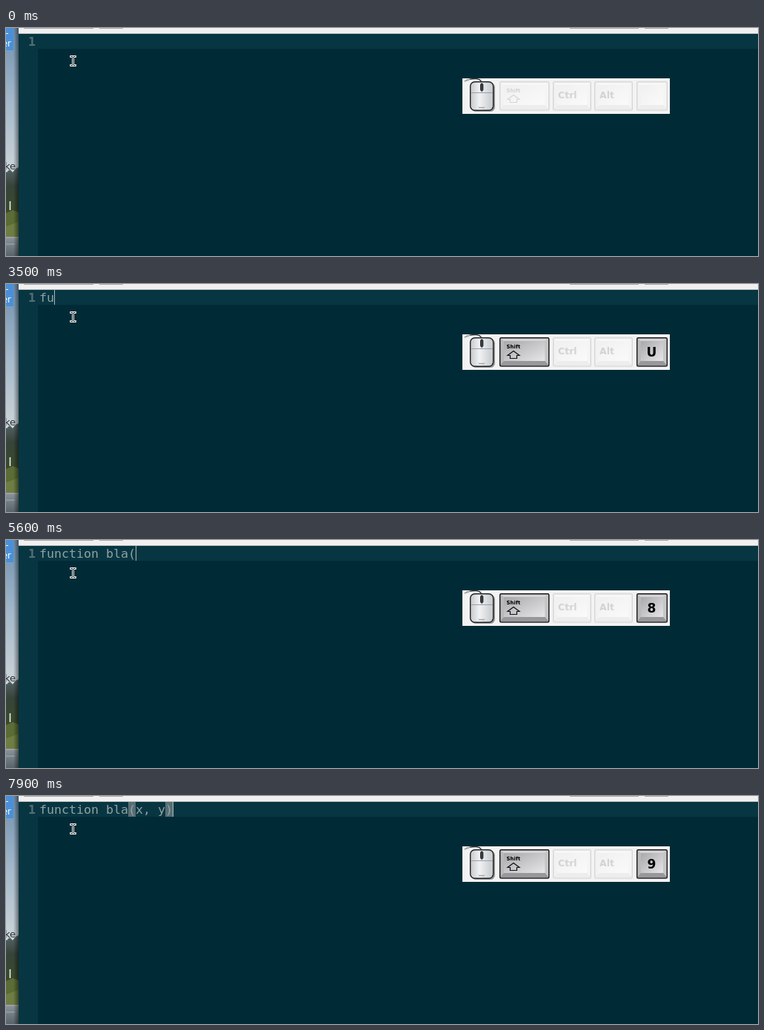
An HTML page for the animation above (8 s loop, 1015 by 308 pixels).

```html
<!DOCTYPE html>
<html lang="en">
<head>
<meta charset="utf-8">
<title>Typing with key display</title>
<style>
  html, body { margin: 0; width: 100%; height: 100%; overflow: hidden; background: #002b36; }
  svg { display: block; }
  .mono { font: 16.61px "DejaVu Sans Mono", monospace; white-space: pre; }
  .desk { font: 13px "DejaVu Sans", sans-serif; text-anchor: end; }
  .cap { font-family: "DejaVu Sans", sans-serif; font-weight: bold; }
  .dim { opacity: .17; }
</style>
</head>
<body>
<svg width="1015" height="308" viewBox="0 0 1015 308">
  <defs>
    <linearGradient id="sky" x2="0" y2="1">
      <stop offset="0" stop-color="#6f90ae"/>
      <stop offset=".5" stop-color="#a3b8c9"/>
      <stop offset="1" stop-color="#ccd4d9"/>
    </linearGradient>
    <linearGradient id="trees" x2="0" y2="1">
      <stop offset="0" stop-color="#56646a"/>
      <stop offset=".4" stop-color="#36443a"/>
      <stop offset="1" stop-color="#3a4a2a"/>
    </linearGradient>
    <linearGradient id="water" x2="0" y2="1">
      <stop offset="0" stop-color="#8b959a"/>
      <stop offset="1" stop-color="#59646a"/>
    </linearGradient>
    <linearGradient id="edge">
      <stop offset="0" stop-opacity="0"/>
      <stop offset="1" stop-opacity=".45"/>
    </linearGradient>
    <linearGradient id="face" x2="1" y2="1">
      <stop offset="0" stop-color="#a9a9ab"/>
      <stop offset="1" stop-color="#e6e6e8"/>
    </linearGradient>
    <linearGradient id="shell">
      <stop offset="0" stop-color="#c6cacd"/>
      <stop offset=".4" stop-color="#f0f2f3"/>
      <stop offset="1" stop-color="#c4c8cc"/>
    </linearGradient>
  </defs>

  <!-- desktop strip -->
  <rect width="17" height="195" fill="url(#sky)"/>
  <path d="M0 196 5 191 9 195 13 190 17 188V252H0Z" fill="url(#trees)"/>
  <path d="M0 250 9 246 17 249V283H0Z" fill="#5b6d35"/>
  <path d="M0 268 17 262V283H0Z" fill="#6d7d43"/>
  <rect y="282" width="17" height="26" fill="url(#water)"/>
  <path d="M0 283H17M0 292H12" stroke="#a9afb0"/>
  <path d="M5.5 234V246" stroke="#eef0ee" stroke-width="1.6"/>
  <rect x="10" width="7" height="308" fill="url(#edge)"/>
  <rect width="10" height="30" fill="#4a90d9"/>
  <path d="M0 7.5H3" stroke="#fff"/>
  <text class="desk" x="7" y="25" fill="#fff" style="font-size:12px">er</text>
  <text class="desk" x="13" y="191" fill="#2a3034">ke</text>

  <!-- editor window -->
  <rect x="17" width="998" height="308" fill="#002b36"/>
  <rect x="17" y="8" width="26" height="300" fill="#073642"/>
  <rect x="17" y="8" width="998" height="20" fill="#073642"/>
  <rect x="17" width="998" height="7" fill="#f0f0f0"/>
  <rect x="17" y="7" width="998" height="1" fill="#b8bcbc"/>
  <path d="M24 0H118M126 0H158M761 0H854M862 0H894" stroke="#8f8f8f" stroke-width="1.6"/>
  <text class="mono" x="30" y="24" fill="#586e75" style="font-weight:bold">1</text>
  <g id="match" fill="#586e75">
    <rect x="165" y="8" width="10" height="20"/>
    <rect x="215" y="8" width="10" height="20"/>
  </g>
  <text class="mono" id="code" x="45" y="24" fill="#93a1a1"></text>
  <rect id="caret" y="8" width="1" height="20" fill="#a9b8b8"/>

  <!-- text pointer -->
  <g fill="none" stroke-linecap="square">
    <path id="beam" d="M88 38.5H89.5L90.5 39.5 91.5 38.5H93M90.5 39.5V49.5M88 50.5H89.5L90.5 49.5 91.5 50.5H93" stroke="#f4f4f4" stroke-width="3"/>
    <use href="#beam" stroke="none"/>
    <path d="M88 38.5H89.5L90.5 39.5 91.5 38.5H93M90.5 39.5V49.5M88 50.5H89.5L90.5 49.5 91.5 50.5H93" stroke="#101010"/>
  </g>

  <!-- key display -->
  <rect id="panel" x="616" y="68" width="280" height="48" fill="#f2f3f2"/>
  <path d="M619 72Q625 68.5 633 68.5T642 74" fill="none" stroke="#333" stroke-width="1.3"/>
  <path d="M619 72Q622 70 626 69" fill="none" stroke="#aab0b0" stroke-width="1.6"/>
  <rect x="628" y="74" width="32" height="39" rx="6" fill="#777" opacity=".75"/>
  <rect x="626.7" y="72.7" width="31" height="38.5" rx="6" fill="url(#shell)" stroke="#222" stroke-width="1.4"/>
  <path d="M628 87.5H657M642 73V87" fill="none" stroke="#9ba0a4"/>
  <rect x="640.5" y="75" width="3.4" height="10" rx="1.7" fill="#3a3f42" stroke="#111" stroke-width=".8"/>
  <path d="M638 107.5H646" stroke="#a2a6aa" stroke-width="1.4"/>
  <g id="keys"></g>
</svg>
<script>
const LOOP = 8000;
const $ = id => document.getElementById(id);

// [time, characters typed, caret shown, shift held, key label]
const LINE = 'function bla(x, y)';
const steps = [[0, 0, 0, 0, ''], [200, 0, 1, 0, ''], [1000, 0, 0, 0, ''],
  [1400, 0, 1, 0, ''], [2300, 0, 0, 0, ''], [2500, 0, 1, 1, '']];
const press = (time, shift, label) => {
  const count = steps[steps.length - 1][1] + 1;
  steps.push([time, count, 1, shift, label || LINE[count - 1].toUpperCase()]);
};
[3400, 3500, 3700, 3800, 4000, 4100, 4200, 4400].forEach(t => press(t, 1));
press(4600, 1, 'Space');
[4900, 5100, 5200].forEach(t => press(t, 1));
press(5600, 1, '8');
steps.push([6200, 13, 1, 0, '']);
press(6500, 0);
press(6700, 0);
press(7200, 0, 'Space');
press(7600, 0);
steps.push([7700, 17, 1, 1, 'Y']);
press(7900, 1, '9');

const label = (text, x, y, size, anchor = 'start') =>
  `<text class="cap" x="${x}" y="${y}" font-size="${size}" text-anchor="${anchor}">${text}</text>`;

function key(x, w, lit, content) {
  const r = x + w, l = x + 6, m = r - 6;
  return `<rect x="${x}" y="72" width="${w}" height="40" rx="2" fill="#fff"/>
    <g class="${lit ? '' : 'dim'}">
      <rect x="${x + .7}" y="72.7" width="${w - 1.4}" height="38.4" rx="1.5" fill="#b9b9bc"/>
      <path d="M${x} 73H${r}L${m} 77H${l}Z" fill="#d4d4d6"/>
      <path d="M${r} 73V111L${m} 104V77Z" fill="#c6c6c9"/>
      <path d="M${x} 111H${r}L${m} 104H${l}Z" fill="#98989c"/>
      <rect x="${l}" y="77" width="${w - 12}" height="27" fill="url(#face)"/>
      <rect x="${x + .7}" y="72.7" width="${w - 1.4}" height="38.4" rx="1.5" fill="none" stroke="#151515" stroke-width="1.4"/>
      ${content}
    </g>`;
}

const ARROW = '<path d="M685 90.5 693 96.5H689.5V100.5H680.5V96.5H677Z" fill="none" stroke="#111" stroke-width="1.2"/>';

function draw([, count, caret, shift, name]) {
  const wide = name === 'Space';
  const cap = wide ? label(name, 860, 88, 8) : label(name, 871.5, 98, 17, 'middle');
  $('code').textContent = LINE.slice(0, count);
  $('caret').setAttribute('x', 45 + 10 * count);
  $('caret').style.opacity = caret;
  $('match').style.opacity = count === LINE.length ? 1 : 0;
  $('panel').setAttribute('width', wide ? 304 : 280);
  $('keys').innerHTML = key(666, 67.5, shift, label('Shift', 675.5, 87, 7) + ARROW)
    + key(738, 52, 0, label('Ctrl', 745, 95, 12.5))
    + key(794, 52, 0, label('Alt', 801, 95, 12.5))
    + key(851, wide ? 67 : 42, name, cap);
}

let shown;
const start = performance.now();
function tick() {
  const t = (performance.now() - start) % LOOP;
  const step = steps.filter(s => s[0] <= t).pop();
  if (step !== shown) draw(shown = step);
  requestAnimationFrame(tick);
}
tick();
</script>
</body>
</html>
```
